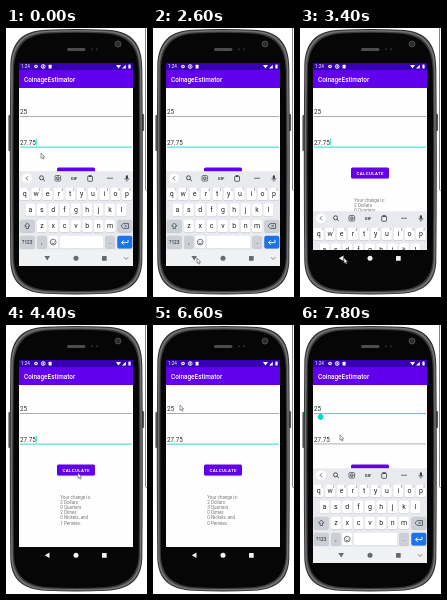
These frames come from a looping animation (141 by 269 pixels, 8000 ms). An HTML page with a canvas:

```html
<!DOCTYPE html>
<html lang="en">
<head>
<meta charset="utf-8">
<title>Change app</title>
<style>
html, body { margin: 0; width: 141px; height: 269px; overflow: hidden; background: #fff; }
canvas { display: block; width: 141px; height: 269px; }
</style>
</head>
<body>
<canvas id="stage"></canvas>
<script>
const W = 141, H = 269, LOOP = 8000, STEP = 200;
const canvas = document.getElementById('stage');
const dpr = window.devicePixelRatio || 1;
canvas.width = W * dpr;
canvas.height = H * dpr;
const c = canvas.getContext('2d');
const TEAL = '#03dac5', PURPLE = '#6200ee', INK = '#3c4043';
const LEFT = 13, TOP = 35, WIDE = 114, NAV = 222, BOTTOM = 238;

// Pointer stops: time, x, y
const path = [
  [0, 35, 125], [200, 37, 118], [400, 40, 110], [800, 40, 110], [1000, 49, 130],
  [1600, 49, 130], [1800, 67, 134], [2000, 67, 139], [2600, 44, 230], [3400, 44, 230],
  [4200, 72, 148], [4600, 72, 148], [5200, 72, 150], [5400, 72, 150], [6200, 27, 80],
  [6800, 27, 80], [7400, 40, 110], [8000, 40, 110]
];

const clamp = v => Math.max(0, Math.min(1, v));
const ease = v => v * v * (3 - 2 * v);

function pointerAt(t) {
  let i = 0;
  while (i < path.length - 2 && t >= path[i + 1][0]) i++;
  const [t0, x0, y0] = path[i], [t1, x1, y1] = path[i + 1];
  const k = ease(clamp((t - t0) / (t1 - t0)));
  return [x0 + (x1 - x0) * k, y0 + (y1 - y0) * k];
}

function rect(x, y, w, h, fill) {
  c.fillStyle = fill;
  c.fillRect(x, y, w, h);
}

function round(x, y, w, h, r, fill, stroke, lw = 0.7) {
  c.beginPath();
  c.roundRect(x, y, w, h, r);
  if (fill) { c.fillStyle = fill; c.fill(); }
  if (stroke) { c.strokeStyle = stroke; c.lineWidth = lw; c.stroke(); }
}

function dot(x, y, r, fill, stroke, lw = 0.8) {
  c.beginPath();
  c.arc(x, y, r, 0, 7);
  if (fill) { c.fillStyle = fill; c.fill(); }
  if (stroke) { c.strokeStyle = stroke; c.lineWidth = lw; c.stroke(); }
}

function poly(pts, fill, stroke, lw = 0.8, open) {
  c.beginPath();
  pts.forEach(([x, y]) => c.lineTo(x, y));
  if (!open) c.closePath();
  if (fill) { c.fillStyle = fill; c.fill(); }
  if (stroke) { c.strokeStyle = stroke; c.lineWidth = lw; c.stroke(); }
}

function text(s, x, y, size, color, align = 'left', weight = 400, gap = 0) {
  c.font = `${weight} ${size}px Roboto, sans-serif`;
  c.letterSpacing = gap + 'px';
  c.textAlign = align;
  c.fillStyle = color;
  c.fillText(s, x, y);
}

// Bulging shell: each quarter mirrors the same curve
function shell(inset, fill) {
  const a = 66 - inset, b = 132.8 - inset;
  c.save();
  c.translate(70.3, 133.8);
  c.beginPath();
  c.moveTo(-a, -b + 39);
  c.bezierCurveTo(-a, -b + 12, -a + 13, -b + 1.5, -a + 36, -b + 0.8);
  c.quadraticCurveTo(0, -b - 0.6, a - 36, -b + 0.8);
  c.bezierCurveTo(a - 13, -b + 1.5, a, -b + 12, a, -b + 39);
  c.quadraticCurveTo(a + 1, 0, a, b - 33);
  c.bezierCurveTo(a - 1, b - 10, a - 14, b - 2, a - 36, b - 0.8);
  c.quadraticCurveTo(0, b + 0.6, 36 - a, b - 0.8);
  c.bezierCurveTo(14 - a, b - 2, 1 - a, b - 10, -a, b - 33);
  c.quadraticCurveTo(-a - 1, 0, -a, -b + 39);
  c.fillStyle = fill;
  c.fill();
  c.restore();
}

function phone() {
  rect(0, 0, W, H, '#fff');
  round(139.5, -4, 8, 166.5, 1, '#fff', '#777', 0.9);
  round(2.4, 87, 3, 36, 1, '#555');
  round(135.5, 86, 2.6, 17, 1, '#555');
  shell(0, '#303032');
  shell(0.9, '#707073');
  shell(2.4, '#3a3a3c');
  shell(3.6, '#060606');
  round(61, 20, 18.5, 3, 1.5, '#4c4d50');
  dot(86, 21.3, 1, '#303134');
  dot(91, 21.3, 1, '#303134');
  dot(112, 16, 3, '#2b2c30', '#55565a', 0.8);
}

function topBars() {
  rect(LEFT, TOP, WIDE, 7, '#3700b3');
  rect(LEFT, 42, WIDE, 18, PURPLE);
  text('1:24', 15, 40.2, 4.6, '#fff');
  dot(30, 38.5, 1.8, '#fff');
  dot(30, 38.5, 0.7, '#3700b3');
  dot(37.2, 38.5, 1.9, null, '#fff', 0.9);
  rect(36.6, 37.4, 1.2, 2.2, '#fff');
  round(42.6, 36.7, 3, 3.8, 0.6, '#fff');
  poly([[110, 37], [115, 37], [112.5, 40.5]], '#fff');
  poly([[119.8, 36.7], [119.8, 40.5], [116, 40.5]], '#fff');
  round(122.4, 36.6, 2.2, 4, 0.4, '#fff');
  text('CoinageEstimator', 18, 53.7, 6.4, '#fff', 'left', 500);
}

function field(s, base, active, caret) {
  text(s, 14, base, 6.3, '#333');
  rect(14, base + 1.9, 112, active ? 1 : 0.7, active ? '#2addcb' : '#8c8c8c');
  if (active && caret) rect(14 + c.measureText(s).width, base - 6.2, 0.8, 7.2, TEAL);
}

function form(t) {
  const first = t >= 6800;
  const caret = t < 1800 || t % 1000 < 500;
  field('25', 86.2, first, caret);
  field('27.75', 116.7, !first, caret);

  round(51, 140, 38, 11.2, 1.5, 'rgba(0,0,0,.14)');
  round(51, 139.5, 38, 11.1, 1.5, t >= 4600 && t < 4800 ? '#8133f1' : PURPLE);
  text('CALCULATE', 70.2, 146.8, 4.4, '#fff', 'center', 600, 0.35);

  const n = t < 4600 ? [2, 0, 2, 0, 1] : [2, 3, 0, 0, 0];
  const units = ['Dollars', 'Quarters', 'Dimes', 'Nickels, and', 'Pennies.'];
  text('Your change is:', 54.3, 173.8, 4.5, '#777');
  units.forEach((u, i) => text(`${n[i]} ${u}`, 54.3, 179 + i * 5.15, 4.5, '#777'));

  if (first) {
    c.save();
    c.translate(20.6, 92);
    c.rotate(Math.PI / 4);
    round(-2.8, -2.8, 5.6, 5.6, [0, 2.8, 2.8, 2.8], TEAL);
    c.restore();
  }
}

function key(x, y, w, fill = '#fff') {
  round(x - w / 2, y + 0.6, w, 12.6, 2, '#c6c9ce');
  round(x - w / 2, y, w, 12.6, 2, fill);
}

function row(chars, x, y, hints) {
  [...chars].forEach((ch, i) => {
    const kx = x + i * 11.35;
    key(kx, y, 9.8);
    text(ch, kx, y + 8.6, 7, '#222', 'center');
    if (hints) text((i + 1) % 10, kx + 3.4, y + 3.6, 2.8, '#666', 'center');
  });
}

function smile(x, y, r) {
  dot(x, y, r, null, INK, 0.7);
  dot(x - r * 0.35, y - r * 0.25, 0.4, INK);
  dot(x + r * 0.35, y - r * 0.25, 0.4, INK);
  c.beginPath();
  c.arc(x, y + 0.2, r * 0.5, 0.2, 2.9);
  c.stroke();
}

function toolbar() {
  const y = 150.3;
  dot(21, y, 4.9, '#fff');
  poly([[22, y - 2], [20, y], [22, y + 2]], null, INK, 0.8, true);
  dot(35.5, y - 0.5, 2, null, INK, 0.9);
  poly([[37, y + 1], [38.9, y + 2.8]], null, INK, 0.9, true);
  round(49, y - 2.8, 5.6, 5.6, 1.2, null, INK, 0.7);
  smile(51.8, y, 1.5);
  text('GIF', 68, y + 1.6, 4.3, INK, 'center', 700);
  round(81.7, y - 2.2, 4.8, 5.2, 0.7, null, INK, 0.8);
  rect(82.8, y - 3, 2.6, 1.7, INK);
  [-2, 0, 2].forEach(d => dot(104 + d, y, 0.7, INK));
  round(119.8, y - 3, 2.2, 4, 1.1, INK);
  c.beginPath();
  c.arc(120.9, y - 0.2, 2.1, 0, Math.PI);
  c.strokeStyle = INK;
  c.lineWidth = 0.6;
  c.stroke();
  rect(120.6, y + 2, 0.6, 1.4, INK);
}

function keyboard(shift) {
  c.save();
  c.translate(0, shift);
  rect(LEFT, 143.2, WIDE, 95, '#e8eaed');
  toolbar();
  row('qwertyuiop', 18.8, 159.7, true);
  row('asdfghjkl', 24.5, 175.6);
  row('zxcvbnm', 35.9, 191.7);
  const gray = '#ccd0d6';
  key(21.3, 191.7, 15, gray);
  poly([[21.3, 195], [24, 198], [22.5, 198], [22.5, 200.5], [20.1, 200.5], [20.1, 198], [18.6, 198]],
    null, INK, 0.7);
  key(118.8, 191.7, 15, gray);
  poly([[115, 198], [117.3, 195.5], [122.5, 195.5], [122.5, 200.5], [117.3, 200.5]], null, INK, 0.7);
  poly([[118.4, 196.7], [120.9, 199.3]], null, INK, 0.6, true);
  poly([[120.9, 196.7], [118.4, 199.3]], null, INK, 0.6, true);

  const y = 207.8;
  key(21.3, y, 15, gray);
  text('?123', 21.3, y + 7.9, 4.8, INK, 'center', 500);
  key(35.9, y, 9.8, gray);
  text(',', 35.9, y + 8, 6.5, INK, 'center');
  key(47.2, y, 9.8);
  smile(47.2, y + 6.3, 2.9);
  key(75.5, y, 43.5);
  key(104, y, 9.8, gray);
  text('.', 104, y + 8, 6.5, INK, 'center');
  key(118.8, y, 15, '#1a73e8');
  poly([[122, y + 4], [122, y + 6.8], [115.6, y + 6.8]], null, '#fff', 0.9, true);
  poly([[117.7, y + 4.6], [115.5, y + 6.8], [117.7, y + 9]], null, '#fff', 0.9, true);
  c.restore();
}

function navBar(t, open) {
  rect(LEFT, NAV, WIDE, BOTTOM - NAV, open ? '#f0f1f3' : '#060606');
  const ink = open ? '#666a6e' : '#f2f2f2';
  if (t >= 3000 && t < 3400) round(28, 223.5, 27, 14, 7, '#d2d4d7');
  if (open) poly([[38.4, 228], [44, 228], [41.2, 232.6]], ink);
  else poly([[43.5, 227.5], [43.5, 233.1], [38.8, 230.3]], ink);
  dot(70, 230.3, 2.5, ink);
  round(96, 228, 4.7, 4.7, 0.5, ink);
  if (open) poly([[118, 229.2], [120.2, 231.4], [122.4, 229.2]], null, ink, 0.8, true);
}

function pointer(x, y) {
  const arrow = [[0, 0], [0, 5.3], [1.2, 4.2], [2.1, 6.1], [3, 5.7], [2.1, 3.9], [3.7, 3.8]];
  poly(arrow.map(([dx, dy]) => [x + dx, y + dy]), '#fff', '#555', 0.6);
}

function draw(t) {
  c.setTransform(dpr, 0, 0, dpr, 0, 0);
  phone();
  c.save();
  c.beginPath();
  c.rect(LEFT, TOP, WIDE, BOTTOM - TOP);
  c.clip();
  rect(LEFT, TOP, WIDE, BOTTOM - TOP, '#fefefe');
  topBars();
  form(t);
  const open = t < 3400 || t >= 7000;
  const slide = t < 5000 ? clamp((t - 3200) / 400) : 1 - clamp((t - 6800) / 400);
  if (slide < 1) keyboard(80 * ease(slide));
  navBar(t, open);
  c.restore();
  pointer(...pointerAt(t));
}

function tick() {
  draw(Math.floor(performance.now() % LOOP / STEP) * STEP);
  requestAnimationFrame(tick);
}
tick();
</script>
</body>
</html>
```
